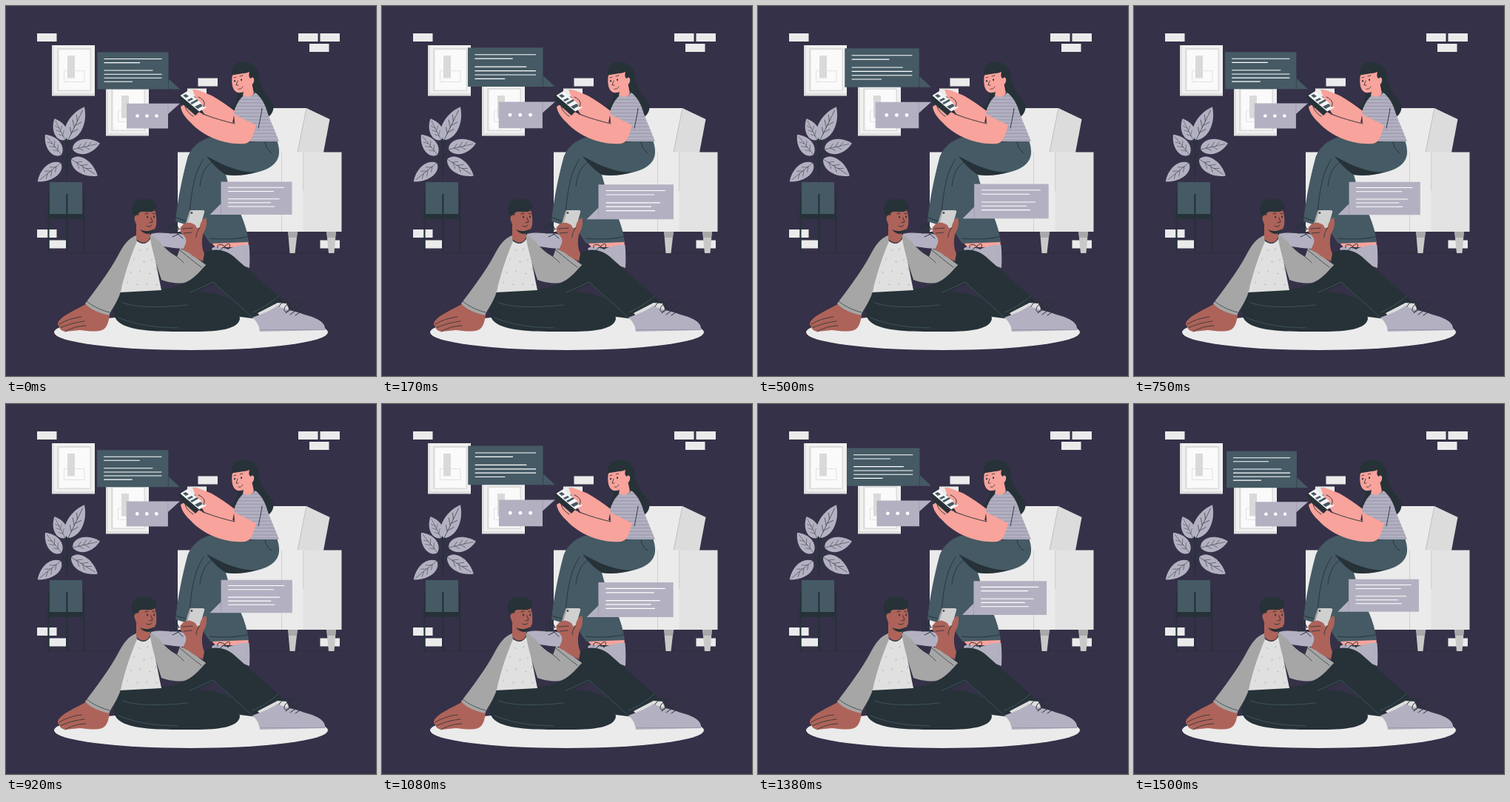
Write an HTML page that moves like this. It is 500 px wide and 500 px high and loops after 1540 ms.

```html
<!DOCTYPE html>
<html lang="en">
<head>
<meta charset="utf-8">
<title>Chatting at home</title>
<style>
html, body { margin: 0; width: 100%; height: 100%; overflow: hidden; background: #353148; }
svg { display: block; width: 100vw; height: 100vh; }
.ink { fill: none; stroke: #263238; stroke-linecap: round; stroke-linejoin: round; }
.dark { fill: #263238; }
.slate { fill: #455a64; }
.lilac { fill: #b3b1c1; }
.pale { fill: #ebebeb; }
.peach { fill: #f8a39b; }
.brown { fill: #ad6359; }
.coat { fill: #a6a6a6; }
.seam { fill: none; stroke: #455a64; stroke-width: .8; stroke-linecap: round; }
.text { fill: none; stroke: #fff; stroke-width: 1.1; }
</style>
</head>
<body>
<svg viewBox="0 0 500 500">
<defs>
  <pattern id="stripes" width="8" height="4.6" patternUnits="userSpaceOnUse">
    <rect width="8" height="4.6" fill="#b3b1c1"/>
    <path d="M0 2H8" stroke="#85839b" stroke-width=".7"/>
  </pattern>
  <g id="leaf">
    <path class="lilac" d="M0 0C3-16 29-18 48 0C32 15 8 16 0 0Z"/>
    <path class="ink" stroke-width=".6" d="M-4 0H43M9 0L16-6M18 0L26-7M27 0L34-5M11 0L18 6M21 0L28 6"/>
  </g>
  <g id="frame">
    <path fill="#e0e0e0" d="M0 0H58V68.500H0Z"/>
    <path fill="#f0f0f0" d="M3 0H58V65H3Z"/>
    <path fill="#dcdcdc" d="M7 4H53V62H7Z"/>
    <path fill="#fafafa" d="M9.500 6H51.500V60.500H9.500Z"/>
    <path fill="#d9d9d9" d="M21 14H31V44.500H21Z"/>
    <path fill="none" stroke="#dcdcdc" stroke-width=".8" d="M16.500 34.500H44V49.500H16.500Z"/>
  </g>
</defs>

<rect width="500" height="500" fill="#353148"/>
<path class="pale" d="M42 37h26.500v11H42ZM395 37h26.500v11H395ZM424.500 37H451v11H424.500ZM410 51h26.500v11H410ZM259.500 97.500h26.500v11H259.500ZM245 111.500h26v11H245ZM42 302h26.500v11H42ZM58.500 316.500H81v11H58.500ZM424.500 316.500H451v11H424.500Z"/>
<path class="ink" stroke-width=".6" d="M57 333.700H452"/>
<use href="#frame" x="62" y="53"/>
<use href="#frame" x="135" y="107"/>

<g id="plant">
  <path class="ink" d="M82 238V205C82 190 82 180 80 176M82 211C82 195 84 186 86 178M82 219C80 209 77 204 73 199M82 214C83 202 86 197 91 193M82 228C81 219 78 213 73 212M82 224C83 214 85 208 90 208"/>
  <use href="#leaf" transform="translate(84 181) rotate(-64) scale(1.040 .9)"/>
  <use href="#leaf" transform="translate(80 181) rotate(-117) scale(.67 .72)"/>
  <use href="#leaf" transform="translate(75 201) rotate(-129) scale(.73 .78)"/>
  <use href="#leaf" transform="translate(90 194) rotate(-13) scale(.79 .82)"/>
  <use href="#leaf" transform="translate(74 212) rotate(141) scale(.84 .8)"/>
  <use href="#leaf" transform="translate(88 207) rotate(32) scale(.88 .82)"/>
  <path class="slate" d="M59 238H103V282H59Z"/>
  <path class="dark" d="M56.500 281H106V288H56.500ZM56.300 254H58.500V333.500H56.300ZM81.300 254H83.500V333.500H81.300ZM104 254H106.200V333.500H104Z"/>
</g>

<g id="sofa">
  <path fill="#c9c9c9" d="M381 304H394L390.500 334H383.500ZM433 304H446L443.500 334H436Z"/>
  <path fill="#a9a9a9" d="M381 304H394L393 313H382.300ZM433 304H446L445 313H434.200Z"/>
  <path class="pale" d="M352 138H406L394 198H352Z"/>
  <path fill="#dcdcdc" d="M406 138L437.500 153L429 198H394Z"/>
  <path class="pale" d="M232 197.500H402V305H232Z"/>
  <path fill="#e3e3e3" d="M401.500 197.500H453.500V305H401.500Z"/>
  <path fill="none" stroke="#c4c4c4" stroke-width=".7" d="M372.500 198V305M401.500 198V250M406 138L394 197"/>
</g>

<g id="woman">
  <path class="dark" d="M306 94C303 81 313 74 323 76C335 76 342 86 342 97C344 112 352 120 360 130C364 140 359 147 353 151L318 151L297 143C306 138 313 128 314 116Z"/>
  <path class="peach" d="M276 318H327.500L328 326L283 326Z"/>
  <path class="lilac" d="M278 328C286 321 293 329 301 328C311 325 319 322 328.500 323C329.500 335 329.500 344 329 354L283 338Z"/>
  <path class="ink" d="M286 327C284 320 294 321 300 329C304 323 303 320 299 322L288 331"/>
  <path class="lilac" d="M196 308C211 304 222 309 234 307L250 313L263 329C248 329 232 328 213 325L196 314Z"/>
  <path class="ink" d="M222 301C219 292 229 290 234 302C226 292 221 294 229 306C234 307 235 312 239 314M222 307L234 302M225 312L238 306"/>
  <path class="slate" d="M328 184C306 188 294 175 279 177C261 180 249 193 245 206C238 232 232 262 229 291L263 302L276 321L328 319C326 303 321 286 305 256L297 228C320 229 346 226 358 217C371 208 371 196 366 181Z"/>
  <path class="dark" d="M271 203C283 209 297 217 312 221C322 224 332 225 340 224C326 229 309 230 297 228C286 221 279 213 271 203Z"/>
  <path class="ink" stroke-width=".9" d="M267 207C253 227 249 258 247 299M279 210C268 218 264 228 262 244M229 286L262 296M276 314C294 316 310 315 326 312M350 184C351 190 354 196 359 198"/>
  <path class="peach" d="M322 109L332 103L335 118C331 125 324 126 320 122Z"/>
  <path fill="url(#stripes)" d="M321 121C327 125 333 122 337 117C346 124 351 135 354 146C359 159 365 172 369 183H329L336 163L307 148C309 137 314 127 321 121Z"/>
  <path class="peach" d="M252 113C262 113 270 118 278 121C290 128 300 135 309 142L306 158C290 153 276 150 268 146L258 129Z"/>
  <path class="peach" d="M308 146L338 161C334 175 332 185 322 186C298 188 267 177 250 158C242 151 237 143 236 136L244 131C253 139 262 145 272 148C286 151 298 155 309 158Z"/>
  <path class="ink" stroke-width=".9" d="M266 146C282 152 296 156 309 159M341 165C343 155 345 147 346 138M242 136C244 142 248 146 253 149"/>
  <path class="dark" d="M233 122L236 119L262 142L256 148L238 132Z"/>
  <path fill="#f4f4f4" d="M235.500 121L245 115L271 137L261 142.500Z"/>
  <path class="slate" d="M239 121L243 119L247 122L243 124ZM245 127L251 124L253 126L247 129ZM249 131L258 126L260 128L251 133ZM255 136L263 132L266 135L259 139Z"/>
  <path class="peach" d="M253 113C261 113 270 119 273 124C274 130 272 134 268 137L264 133C266 130 265 126 260 123Z"/>
  <path class="ink" stroke-width=".9" d="M260 123C267 126 270 130 267 136"/>
  <path class="peach" d="M306 93C304 104 306 115 313 117C320 118 327 114 331 106C337 106 338 95 332 95L330 87Z"/>
  <path class="dark" d="M305 94C304 82 313 75 323 77C335 77 342 89 341 105L334 105C337 99 334 94 331 98C328 97 328 93 329 89C322 92 313 91 305 94Z"/>
  <path class="ink" stroke-width=".8" d="M308 97L311 96M316 95L320 94M313 101L311 107L314 107M314 112C317 113 319 111 320 109"/>
  <path class="dark" d="M309 100a1 1.300 0 1 0 .1 0ZM318 98.500a1 1.300 0 1 0 .1 0Z"/>
</g>

<ellipse class="pale" cx="250" cy="441" rx="185" ry="24"/>

<g id="man">
  <path class="dark" d="M212 383C240 379 260 365 269 350L264 338C279 324 297 330 307 338L378 401C367 411 353 418 340 423L316 420L266 386Z"/>
  <path class="dark" d="M152 387C144 402 143 416 150 425C165 441 210 440 255 440C291 440 313 436 316 423C316 405 292 386 266 383L212 382Z"/>
  <path fill="#353148" d="M260 386L281 375L316 408C305 394 285 387 260 386Z"/>
  <path class="seam" d="M249 387C261 382 271 377 280 373L333 421M157 401C180 409 214 407 246 404M152 421C180 433 206 434 232 435M368 392C358 401 344 410 333 414"/>
  <path fill="#dedede" d="M340 415L367 401L379 402L383 411L348 424Z"/>
  <path class="lilac" d="M333 421C347 416 358 411 367 405C377 411 389 411 403 417C420 421 433 428 431 438L343 440C342 431 338 425 333 421Z"/>
  <path fill="none" stroke="#8f8da1" stroke-width=".7" d="M343 437.500H431"/>
  <path class="ink" d="M369 406C376 394 387 398 383 408C382 414 375 415 376 409C379 400 394 395 400 401C403 405 392 407 382 409M378 415L389 407M384 417L395 409M391 418L400 412"/>
  <path class="brown" d="M109 402L140 416C139 426 137 435 130 438C121 441 109 439 100 438L80 440C75 439 72 436 73 434C69 432 69 427 73 424C80 416 96 410 109 402Z"/>
  <path class="ink" stroke-width=".8" d="M72 430C82 424 93 421 102 420M73 435C84 430 96 427 106 426M80 440C88 435 99 432 108 432"/>
  <path fill="#e0e0e0" d="M175 316C184 324 191 322 196 313C201 339 206 364 210 384L154 387C158 365 166 341 175 316Z"/>
  <path fill="none" stroke="#a9a9a9" stroke-width=".7" d="M179 329l3 2M190 330l2-3M172 343l2-3M185 345l3 1M196 344l2-2M167 359l3 2M180 360l2-3M193 361l3 1M202 357l1-3M163 375l2-3M176 376l3 1M189 377l2-3M202 376l3 1"/>
  <path class="coat" d="M176 310C165 314 159 323 152 336C139 360 122 382 107 402C115 411 127 415 139 418C144 408 151 399 155 386C160 363 168 339 177 318Z"/>
  <path class="coat" d="M194 309C203 312 208 319 214 326C220 332 226 336 231 339L235 328L249 334L270 350C260 361 251 371 241 374C228 376 216 372 210 370C204 351 197 330 194 309Z"/>
  <path class="ink" stroke-width=".7" d="M109 399C119 407 129 411 140 414M231 339C235 342 238 344 240 347"/>
  <path class="brown" d="M176 296L195 302L194 314C190 322 181 321 176 314Z"/>
  <path class="brown" d="M174 281C173 269 185 264 197 270C203 276 204 287 203 296C201 304 195 308 188 305C178 304 173 293 174 281Z"/>
  <path class="dark" d="M181 302C188 305 194 305 200 301C198 309 188 311 181 302ZM176 291C169 280 168 270 174 264C181 259 197 260 202 266C206 274 200 279 193 278C188 279 181 276 179 281V290Z"/>
  <ellipse class="brown" cx="177" cy="287" rx="3.500" ry="4.500"/>
  <path class="ink" stroke-width=".9" d="M188 281L192 280M198 280L201 281M196 286L198 292L194 293M190 297C193 299 196 298 197 296"/>
  <path class="dark" d="M191 283.500a1 1.500 0 1 0 .1 0ZM200 283.500a1 1.500 0 1 0 .1 0Z"/>
  <path class="brown" d="M244 295C236 297 233 303 238 308C243 312 245 317 242 323L238 331L266 345L268 335C264 325 264 315 267 306C271 300 272 293 270 286C266 288 264 291 263 295Z"/>
  <path fill="#d0d0d0" d="M249 276H266Q269 276 268 279L263 297Q262 300 259 300L242 297Z"/>
  <path fill="#aaa" d="M248.500 276L242 297L244 298L250.500 276Z"/>
  <circle class="dark" cx="251" cy="279.500" r="1.200"/>
  <path class="brown" d="M235 301C239 293 246 291 252 294C257 296 259 299 256 302L247 304ZM270 286C266 288 262 293 262 299L266 302C270 297 272 291 270 286Z"/>
  <path class="ink" stroke-width=".8" d="M238 301L252 300M240 307L251 306M262 299C259 304 257 307 257 312"/>
  <path class="coat" d="M234 327L246 333L270 350L257 360Z"/>
  <path class="ink" stroke-width=".7" d="M235 330C245 338 254 346 264 353"/>
</g>

<g id="chat">
  <path class="slate" d="M123.500 62.500H219.500V98L235 112.500H123.500Z"/>
  <path class="ink" stroke-width=".5" d="M219.500 98V112.500"/>
  <path class="text" d="M132.500 71.500H210.500M132.500 76.600H181M132.500 87H198.500M132.500 92.200H210.500M132.500 97.300H210.500M132.500 102.300H171"/>
  <path class="lilac" d="M163 131.700H235L219 146V165.500H163Z"/>
  <path fill="none" stroke="#8f8da1" stroke-width=".5" d="M219 131.700V146"/>
  <path fill="#fff" d="M175.200 148.500a2.300 2.300 0 1 0 4.600 0a2.300 2.300 0 1 0-4.600 0ZM188.200 148.500a2.300 2.300 0 1 0 4.600 0a2.300 2.300 0 1 0-4.600 0ZM201.200 148.500a2.300 2.300 0 1 0 4.600 0a2.300 2.300 0 1 0-4.600 0Z"/>
  <path class="lilac" d="M290.500 237.500H386.500V282H275.500L290.500 267Z"/>
  <path fill="none" stroke="#8f8da1" stroke-width=".5" d="M290.500 267V282"/>
  <path class="text" d="M300 245.300H376M300 250.500H362M300 260.800H369.500M300 265.800H358M300 271H363"/>
</g>
</svg>
<script>
const LOOP = 1540, FPS = 24, FRAMES = 37;
const cx = 255.3, cy = 172;
// [ms, scale] turning points of the double pulse
const beat = [[0, 1], [262, 1.09], [855, .984], [1187, 1.087], [1500, .988], [LOOP, 1]];
const chat = document.getElementById('chat');

function scaleAt(t) {
  const i = beat.findIndex(k => k[0] > t);
  const [t0, s0] = beat[i - 1], [t1, s1] = beat[i];
  return s0 + (s1 - s0) * (t - t0) / (t1 - t0);
}

function draw() {
  const t = performance.now() % LOOP;
  const step = Math.floor((t + 5) * FPS / 1000) % FRAMES;
  const s = scaleAt(step * 1000 / FPS);
  chat.setAttribute('transform', `translate(${cx} ${cy}) scale(${s}) translate(${-cx} ${-cy})`);
  requestAnimationFrame(draw);
}
draw();
</script>
</body>
</html>
```
